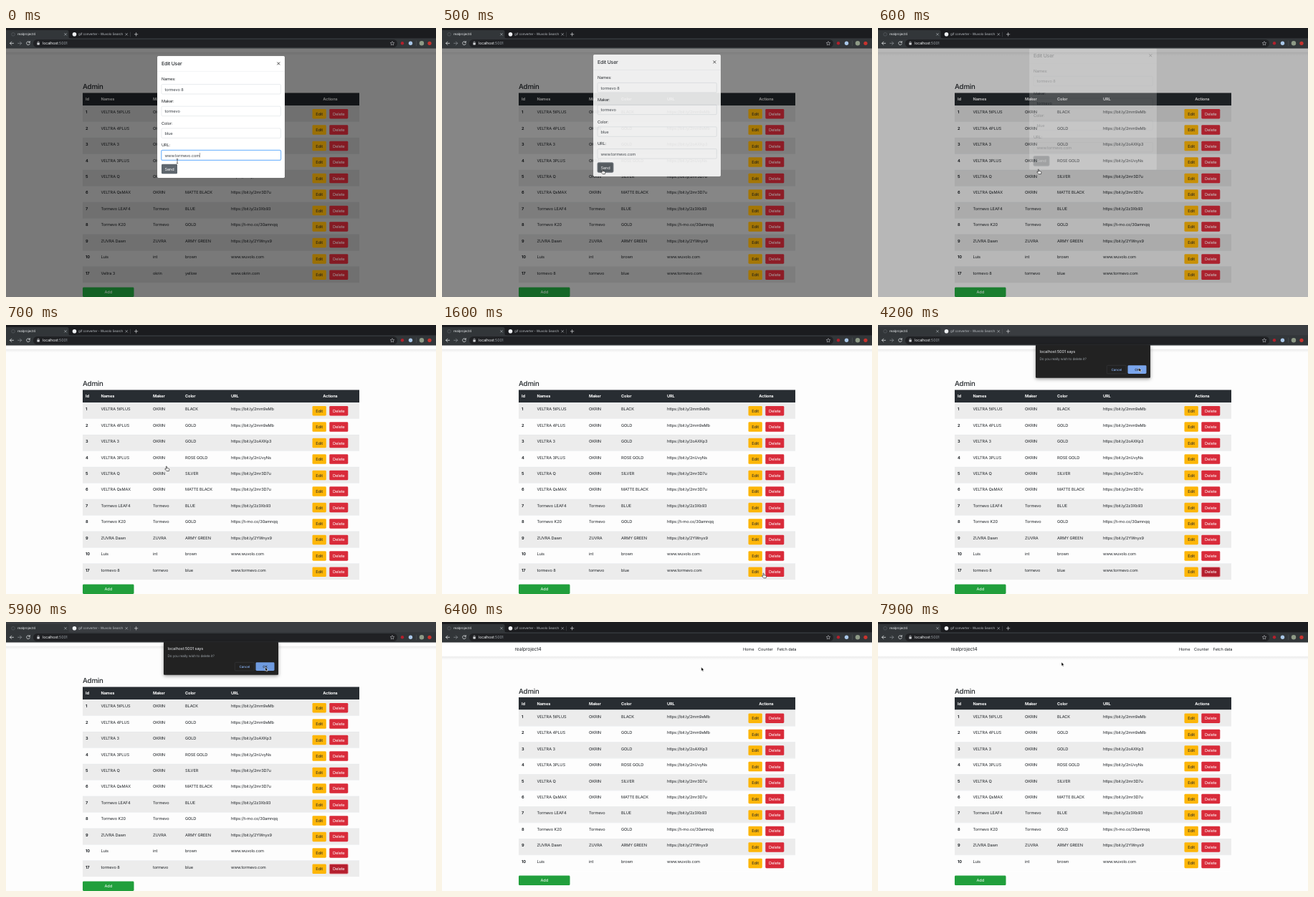
These frames come from a looping animation (600x375 px, 8000 ms). An HTML page:

```html
<!DOCTYPE html>
<html lang="en">
<head>
<meta charset="utf-8">
<title>Admin</title>
<style>
html, body { margin: 0; width: 100%; height: 100%; overflow: hidden; background: #fff; }
svg { display: block; width: 100%; height: 100%; }
text { font-family: Inter, "Open Sans", sans-serif; letter-spacing: -.02em; text-rendering: geometricPrecision; white-space: pre; }
</style>
</head>
<body>
<svg id="stage" viewBox="0 0 600 375">
  <defs>
    <linearGradient id="shade" x2="0" y2="1"><stop stop-color="#000" stop-opacity=".07"/><stop offset="1" stop-color="#000" stop-opacity="0"/></linearGradient>
    <filter id="soft" x="-20%" y="-30%" width="140%" height="170%"><feDropShadow dx="0" dy="1.5" stdDeviation="2.5" flood-opacity=".4"/></filter>
  </defs>
</svg>
<script>
const LOOP = 8000, STEP = 100, ROW = 22.47, TOP = 108, FONT = 5.65;
const stage = document.getElementById('stage');

function add(parent, tag, attrs = {}, content) {
  const node = document.createElementNS('http://www.w3.org/2000/svg', tag);
  set(node, attrs);
  if (content !== undefined) node.textContent = content;
  parent.appendChild(node);
  return node;
}
function set(node, attrs) {
  for (const key in attrs) node.setAttribute(key, attrs[key]);
}
const group = (parent, attrs) => add(parent, 'g', attrs);
const rect = (parent, x, y, width, height, fill, more) =>
  add(parent, 'rect', { x, y, width, height, fill, ...more });
const disc = (parent, cx, cy, r, fill, more) => add(parent, 'circle', { cx, cy, r, fill, ...more });
const line = (parent, d, stroke, width = .7) =>
  add(parent, 'path', { d, stroke, 'stroke-width': width, fill: 'none', 'stroke-linecap': 'round' });
// y is the middle of the line of text
const label = (parent, x, y, str, fill = '#212529', size = FONT, more) =>
  add(parent, 'text', { x, y: y + size * .36, fill, 'font-size': size, ...more }, str);
const show = (node, on) => node.setAttribute('display', on ? 'inline' : 'none');
const mid = { 'text-anchor': 'middle' };

function button(parent, x, y, w, fill, str, ink = '#fff', h = 13.5) {
  const g = group(parent);
  const box = rect(g, x, y, w, h, fill, { rx: 1.4 });
  label(g, x + w / 2, y + h / 2, str, ink, FONT, mid);
  return box;
}

// Page
const page = group(stage);
rect(page, 0, 0, 600, 420, '#fdfdfd');
rect(page, 0, 33.5, 600, 5, 'url(#shade)');
rect(page, 0, 10, 600, 23.5, '#fff');
label(page, 101.5, 23.5, 'realproject4', '#212529', 6.8);
[[420, 'Home'], [441, 'Counter'], [467.5, 'Fetch data']].forEach(([x, s]) => label(page, x, 23.5, s));
label(page, 107, 82, 'Admin', '#212529', 9.7, { 'font-weight': 500 });

const cols = [111, 132.5, 205, 250, 314];
rect(page, 107, 90.5, 386, 17.5, '#282d32');
['Id', 'Names', 'Maker', 'Color', 'URL'].forEach((s, i) =>
  label(page, cols[i], 99.4, s, '#fff', FONT, { 'font-weight': 700 }));
label(page, 452.5, 99.4, 'Actions', '#fff', FONT, { 'font-weight': 700, ...mid });

const link = 'https://bit.ly/';
const rows = [
  [1, 'VELTRA 5tPLUS', 'OKRIN', 'BLACK', link + '2mm9eMb'],
  [2, 'VELTRA 4PLUS', 'OKRIN', 'GOLD', link + '2mm9eMb'],
  [3, 'VELTRA 3', 'OKRIN', 'GOLD', link + '2oAXKp3'],
  [4, 'VELTRA 3PLUS', 'OKRIN', 'ROSE GOLD', link + '2nUvyNs'],
  [5, 'VELTRA Q', 'OKRIN', 'SILVER', link + '2mr3D7u'],
  [6, 'VELTRA QsMAX', 'OKRIN', 'MATTE BLACK', link + '2mr3D7u'],
  [7, 'Tormevo LEAF4', 'Tormevo', 'BLUE', link + '2z3Xb93'],
  [8, 'Tormevo K20', 'Tormevo', 'GOLD', 'https://t-mo.co/30amnqq'],
  [9, 'ZUVRA Dawn', 'ZUVRA', 'ARMY GREEN', link + '2YWnyx9'],
  [10, 'Luis', 'int', 'brown', 'www.wuvolo.com'],
  [17, 'Veltra 3', 'okrin', 'yellow', 'www.okrin.com']
];
const edited = [17, 'tormevo 8', 'tormevo', 'blue', 'www.tormevo.com'];

const backdrop = rect(stage, 0, 28, 600, 347, '#000');
const actions = group(stage);
let lastRow, lastCells, lastButtons, lastEdit, lastDelete;
rows.forEach((cells, i) => {
  const y = TOP + i * ROW;
  lastRow = group(page);
  rect(lastRow, 107, y, 386, ROW, i % 2 ? '#fdfdfd' : '#ececec');
  rect(lastRow, 107, y, 386, .36, '#dee2e6');
  lastCells = cells.map((s, c) =>
    label(lastRow, cols[c], y + 9.1, s, '#212529', FONT, { 'font-weight': c ? 400 : 700 }));
  lastButtons = group(actions);
  lastEdit = button(lastButtons, 427.5, y + 4.9, 19.3, '#fdb608', 'Edit', '#212529');
  lastDelete = button(lastButtons, 451.3, y + 4.9, 26, '#d92b3a', 'Delete');
});
const addButton = group(actions);
button(addButton, 107, 361.5, 71.5, '#219f3c', 'Add');

// Edit form
const modal = group(stage);
rect(modal, 211, 39, 178, 170, '#fff', { rx: 1.7, stroke: '#000', 'stroke-opacity': .2, 'stroke-width': .36 });
rect(modal, 211, 60.4, 178, .36, '#dee2e6');
label(modal, 217, 49.5, 'Edit User', '#212529', 6.9, { 'font-weight': 500 });
line(modal, 'M378.7 47.9l3.2 3.2m0-3.2l-3.2 3.2', '#333', .9);
let urlText;
['Names:', 'Maker:', 'Color:', 'URL:'].forEach((s, i) => {
  const y = 71.3 + i * 30.7;
  label(modal, 217, y, s);
  rect(modal, 217, y + 7.2, 166.3, 13.5, '#fff', { rx: 1.4, stroke: '#ced4da', 'stroke-width': .45 });
  urlText = label(modal, 221.5, y + 14.3, edited[i + 1], '#3d4349');
});
const focusRing = rect(modal, 216.7, 170.3, 166.9, 14, 'none', { rx: 1.6, stroke: '#80bdff', 'stroke-width': 1.2 });
const caret = rect(modal, 221.6 + urlText.getComputedTextLength(), 174, .4, 6.4, '#222');
const sendButton = button(modal, 217, 189.8, 22, '#5f676e', 'Send');

// Browser bars
const bars = group(stage);
const tabBar = rect(bars, 0, 0, 600, 15, '#1b1c1f');
add(bars, 'path', { d: 'M0 15V3H85q2.5 0 2.5 2.5V12q0 2.5 2.5 2.5V15z', fill: '#323639' });
rect(bars, 0, 14.3, 600, 14.2, '#323639');
rect(bars, 38, 16, 508, 11, '#202124', { rx: 5.5 });
disc(bars, 10, 8.8, 2.3, 'none', { stroke: '#5f6368', 'stroke-width': .6 });
label(bars, 16, 8.8, 'realproject4', '#e8eaed', 4.6);
disc(bars, 95.5, 8.8, 2.8, '#eef0f3');
label(bars, 101, 8.8, 'gif converter - Wuvolo Search', '#bdc1c6', 4.55);
line(bars, 'M81.6 7.4l2.8 2.8m0-2.8l-2.8 2.8M166.8 7.4l2.8 2.8m0-2.8l-2.8 2.8', '#bdc1c6', .6);
line(bars, 'M173.5 6v6', '#5f6368', .4);
line(bars, 'M179.4 8.8h4.4m-2.2-2.2v4.4', '#d5d7da');
line(bars, 'M10.5 21.3h-5m2.2-2.2l-2.2 2.2l2.2 2.2', '#e0e2e5', .8);
line(bars, 'M16.7 21.3h5m-2.2-2.2l2.2 2.2l-2.2 2.2', '#85898e', .8);
line(bars, 'M33 19.8a2.4 2.4 0 1 0 .3 2.2M33.3 18.6v1.6h-1.6', '#e0e2e5', .8);
rect(bars, 43.4, 20.7, 3.4, 2.8, '#d5d7da', { rx: .4 });
line(bars, 'M44.1 20.7v-.8a1 1 0 0 1 2 0v.8', '#d5d7da', .6);
const address = label(bars, 51, 21.3, 'localhost', '#f1f3f4', 5.3);
add(address, 'tspan', { fill: '#9aa0a6' }, ':5001');
add(bars, 'path', { d: 'M539 18.6l.8 1.8l2 .2l-1.5 1.3l.4 2l-1.7-1l-1.7 1l.4-2l-1.5-1.3l2-.2z', fill: 'none', stroke: '#d5d7da', 'stroke-width': .5 });
disc(bars, 553, 21.3, 2.2, '#b3202c');
disc(bars, 564.5, 21.3, 2.7, '#a9c7e8');
line(bars, 'M572.5 18v6.6', '#5f6368', .4);
disc(bars, 580, 21.3, 3.2, '#8e9a86');
disc(bars, 591, 21.3, 2.6, '#c9332e');

// Confirm box
const dialog = group(stage);
rect(dialog, 220, 27.5, 160, 46.2, '#202124', { rx: 1.2, filter: 'url(#soft)' });
label(dialog, 225.5, 37, 'localhost:5001 says', '#e8eaed', 5.6);
label(dialog, 225.5, 47.4, 'Do you really wish to delete it?', '#9aa0a6', 4.75);
rect(dialog, 319.3, 56.3, 27, 11.6, 'none', { rx: 1.4, stroke: '#3c4043', 'stroke-width': .5 });
label(dialog, 332.8, 62.1, 'Cancel', '#8ab4f8', 4.5, { 'font-weight': 500, ...mid });
const okBox = rect(dialog, 348.5, 56.3, 26, 11.6, '#8ab4f8', { rx: 1.4 });
label(dialog, 361.5, 62.1, 'OK', '#202124', 4.5, { 'font-weight': 500, ...mid });

// Pointers, each with its tip at 0,0
const pointer = group(stage);
const shapes = {
  beam: 'M-1.2-3q1.2 0 1.2.8q0-.8 1.2-.8M0-2.2v5M-1.2 3.4q1.2 0 1.2-.8q0 .8 1.2.8',
  hand: 'M-.5.6q0-.8.6-.8t.6.8v2q1.2-.3 1.5.3q1-.2 1.2.5q.8 0 .7 1l-.5 2.2h-3.2L-1.9 4.2q-.3-.8.4-.8l1 .7z',
  arrow: 'M0 0v5.3l1.2-1.1l.8 1.9l1-.4l-.8-1.9h1.7z'
};
const paint = {
  beam: { fill: 'none', stroke: '#111', 'stroke-width': .6 },
  hand: { fill: '#fff', stroke: '#111', 'stroke-width': .6 },
  arrow: { fill: '#000', stroke: '#fff', 'stroke-width': .5 }
};
const cursors = {};
for (const kind in shapes) cursors[kind] = add(pointer, 'path', { d: shapes[kind], ...paint[kind] });

// time, x, y
const path = [
  [0, 239, 185.5], [300, 223.8, 197], [900, 223.8, 197], [1200, 446, 346], [1400, 446, 346],
  [2200, 462, 347], [3300, 462, 347], [4000, 364, 59.7], [5000, 364, 59.7], [5400, 361.8, 63],
  [6400, 361.8, 63], [7000, 290, 70], [7400, 290, 70], [7900, 256, 56]
];
const clamp = v => Math.min(1, Math.max(0, v));
const ramp = (t, from, to) => clamp((t - from) / (to - from));
const ease = v => v * v * (3 - 2 * v);

function place(t) {
  let [, x, y] = path[0];
  for (let i = 1; i < path.length; i++) {
    const k = ease(ramp(t, path[i - 1][0], path[i][0]));
    x += (path[i][1] - path[i - 1][1]) * k;
    y += (path[i][2] - path[i - 1][2]) * k;
  }
  return [x, y];
}

function draw(t) {
  const [x, y] = place(t);
  const asking = t >= 2800 && t < 6000;
  const removed = t >= 6100;
  const scroll = `translate(0 ${removed ? 14.5 : 0})`;

  set(page, { transform: scroll });
  set(actions, { transform: scroll });
  set(addButton, { transform: `translate(0 ${removed ? -ROW : 0})` });
  show(lastRow, !removed);
  show(lastButtons, !removed);
  lastCells.forEach((cell, i) => cell.textContent = (t < 400 ? rows[10] : edited)[i]);

  const dim = t < 500 ? .52 : t < 600 ? .47 : t < 700 ? .28 : 0;
  set(backdrop, { opacity: dim });
  actions.style.filter = dim ? `brightness(${1 - dim * .75})` : 'none';

  const out = ramp(t, 480, 610);
  show(modal, t < 700);
  set(modal, { opacity: 1 - out * .85, transform: `translate(0 ${-1.8 * (t >= 500) - 11 * out * out})` });
  show(focusRing, t < 300);
  show(caret, t < 300);
  set(sendButton, t < 300 ? { fill: '#5f676e', stroke: 'none' }
    : { fill: '#4e555b', stroke: '#7b8289', 'stroke-width': 1 });

  const onEdit = t >= 1200 && x < 446.8 && y > 337;
  const onDelete = x > 451.3 && y > 337;
  const pressed = t >= 2400;
  set(lastEdit, { fill: onEdit ? '#e0a206' : '#fdb608' });
  set(lastDelete, {
    fill: pressed ? '#b51f2e' : onDelete ? '#c32735' : '#d92b3a',
    stroke: pressed ? '#e99aa2' : 'none', 'stroke-width': .9
  });

  show(dialog, asking);
  const onOk = y < 68 && y > 56 && x > 348.5;
  set(okBox, { fill: t >= 5800 ? '#6f9be0' : onOk ? '#7aa5ec' : '#8ab4f8' });
  set(tabBar, { fill: asking ? '#3a3d41' : '#1b1c1f' });

  const kind = t < 200 ? 'beam' : t < 2800 ? 'hand' : 'arrow';
  for (const name in cursors) show(cursors[name], name === kind);
  set(pointer, { transform: `translate(${x} ${y})` });
}

const start = performance.now();
function tick() {
  const t = (performance.now() - start) % LOOP;
  draw(Math.floor(t / STEP) * STEP);
  requestAnimationFrame(tick);
}
tick();
</script>
</body>
</html>
```
